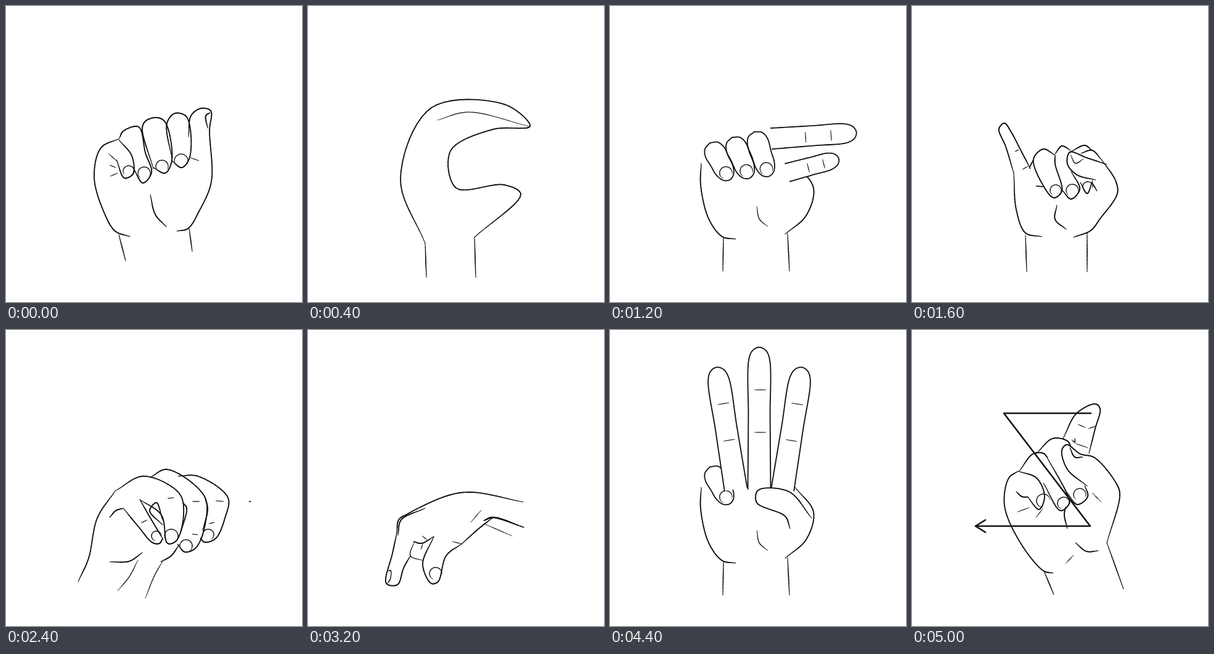
Recreate the animation shown at these times as an HTML page with a canvas. Size 480 by 480 pixels, loop 5200 ms.

```html
<!DOCTYPE html>
<html lang="en">
<head>
<meta charset="utf-8">
<title>Hand alphabet</title>
<style>
html, body { margin: 0; width: 100%; height: 100%; overflow: hidden; background: #fff; }
canvas { display: block; }
</style>
</head>
<body>
<canvas id="stage" width="480" height="480"></canvas>
<script>
const ctx = document.getElementById('stage').getContext('2d');
const STEP = 200;
const rad = deg => deg * Math.PI / 180;

function pairs(xy) {
  const pts = [];
  for (let i = 0; i < xy.length; i += 2) pts.push([xy[i], xy[i + 1]]);
  return pts;
}

// Centripetal spline through a few points.
function smooth(pts) {
  const gap = i => Math.sqrt(Math.hypot(pts[i + 1][0] - pts[i][0], pts[i + 1][1] - pts[i][1])) || 1;
  const last = pts.length - 1;
  const slope = (i, j) => {
    if (i === 0) return (pts[1][j] - pts[0][j]) / gap(0);
    if (i === last) return (pts[i][j] - pts[i - 1][j]) / gap(i - 1);
    const a = gap(i - 1), b = gap(i);
    return ((pts[i][j] - pts[i - 1][j]) / a * b + (pts[i + 1][j] - pts[i][j]) / b * a) / (a + b);
  };
  const out = [pts[0]];
  for (let i = 0; i < last; i++) {
    const g = gap(i);
    for (let k = 1; k <= 10; k++) {
      const t = k / 10, s = 1 - t;
      out.push([0, 1].map(j =>
        (1 + 2 * t) * s * s * pts[i][j] + t * t * (3 - 2 * t) * pts[i + 1][j] +
        g * t * s * (s * slope(i, j) - t * slope(i + 1, j))));
    }
  }
  return out;
}

function trace(pts) {
  ctx.beginPath();
  pts.forEach(p => ctx.lineTo(p[0], p[1]));
}

function ink(pts, width, taper) {
  const last = pts.length - 1;
  if (!taper) {
    ctx.lineWidth = width;
    trace(pts);
    ctx.stroke();
    return;
  }
  for (let i = 0; i < last; i++) {
    ctx.lineWidth = width * (0.6 + 0.4 * Math.min(1, Math.min(i, last - 1 - i) / 5));
    trace([pts[i], pts[i + 1]]);
    ctx.stroke();
  }
}

const pen = (...xy) => ink(smooth(pairs(xy)), 1.85, true);
const thin = (...xy) => ink(smooth(pairs(xy)), 1.25, true);
const bold = (...xy) => ink(smooth(pairs(xy)), 2.6, true);
const ruler = (...xy) => ink(pairs(xy), 2.6, false);

function patch(...xy) {
  const line = smooth(pairs(xy));
  trace(line);
  ctx.fill();
  ink(line, 1.85, true);
}

// Arc that stays open toward the fingertip.
function nail(x, y, r, deg) {
  const pts = [];
  for (let a = 55; a <= 305; a += 10) {
    pts.push([x + r * Math.cos(rad(deg + a)), y + r * Math.sin(rad(deg + a))]);
  }
  ink(pts, 1.25, true);
}

// Finger from its base; deg is measured clockwise from straight up.
function limb(x, y, deg, len, w, round) {
  const ux = Math.sin(rad(deg)), uy = -Math.cos(rad(deg)), r = w / 2;
  const at = ([along, side]) => [x + ux * along - uy * side, y + uy * along + ux * side];
  const half = round ? [[0, 0], [r * 0.3, r * 0.7], [r, r]] : [[0, r]];
  half.push([len / 2, r * 0.95], [len - r, r * 0.9], [len - r * 0.25, r * 0.55]);
  const mirror = half.map(([a, s]) => [a, -s]).reverse();
  const shape = smooth([...half, [len, 0], ...mirror].map(at));
  trace(shape);
  ctx.fill();
  ink(shape, 1.85, false);
  if (round) {
    nail(...at([len - r * 0.75, 0]), r * 0.6, deg - 90);
  } else {
    for (const k of [0.4, 0.7]) thin(...at([len * k, r * 0.6]), ...at([len * k, -r * 0.4]));
  }
}

// Fingers are numbered from the little finger, 0, to the index, 3.
const up = (k, deg, len) => limb(166 + 38 * k, 258, deg, len, k ? 37 : 32);
const curl = k => limb(162 + 36 * k, 222 - 9 * Math.min(k, 2), 152 + 5 * k, 68 + 4 * k, 34, true);

function palm(...curled) {
  pen(148, 255, 147, 290, 160, 345, 182, 374, 204, 378);
  pen(300, 255, 330, 295, 318, 340, 284, 370);
  pen(184, 375, 183, 430);
  pen(288, 369, 291, 430);
  thin(238, 325, 242, 345, 256, 358);
  curled.forEach(curl);
}

function thumb(drop = 0) {
  patch(327, 305, 290, 262 + drop, 240, 260 + drop, 238, 280 + drop, 284, 302 + drop, 292, 322);
}

function littleUp() {
  pen(165, 271, 152, 228, 141, 199, 150, 190, 160, 203, 178, 237, 192, 264);
  thin(167, 236, 173, 233);
  thin(179, 265, 188, 260);
  pen(165, 270, 169, 330, 184, 368, 211, 374);
  pen(190, 263, 197, 249);
  pen(232, 242, 213, 232, 197, 248, 211, 288, 230, 311, 243, 300, 232, 256, 232, 242);
  nail(233, 299, 9, 75);
  pen(201, 292, 214, 293);
  pen(232, 240, 243, 227, 257, 234);
  pen(243, 298, 258, 313, 272, 297, 258, 268);
  nail(260, 299, 10, 80);
  pen(258, 236, 280, 226, 292, 234);
  pen(273, 286, 284, 304, 293, 283);
  nail(285, 293, 8, 70);
  pen(292, 286, 300, 300);
  pen(316, 257, 283, 246, 256, 237, 252, 256, 268, 274, 298, 282);
  thin(257, 241, 265, 255, 278, 248);
  pen(274, 239, 292, 234, 308, 250);
  pen(308, 250, 330, 283, 333, 304, 305, 345, 290, 364, 262, 375);
  pen(235, 323, 232, 346, 250, 362);
  pen(184, 372, 186, 431);
  pen(284, 368, 284, 431);
}

function draped() {
  pen(117, 408, 134, 370, 148, 305, 177, 261);
  pen(177, 261, 223, 237, 281, 265, 288, 300, 276, 342, 262, 346, 252, 300, 217, 275);
  nail(268, 334, 11, 105);
  pen(168, 304, 178, 293, 191, 289);
  pen(191, 290, 214, 318, 238, 345, 249, 346, 254, 338);
  pen(217, 275, 236, 308, 255, 340);
  nail(244, 334, 8, 50);
  thin(219, 313, 229, 308);
  pen(254, 316, 233, 293, 244, 280, 254, 308);
  pen(234, 239, 261, 226, 322, 270, 323, 315, 308, 353, 290, 360, 278, 347);
  pen(283, 330, 293, 289, 288, 281);
  nail(292, 350, 10, 110);
  thin(302, 278, 314, 278);
  thin(262, 273, 272, 272);
  thin(302, 331, 311, 332);
  pen(168, 376, 200, 375, 221, 361);
  pen(251, 376, 268, 366, 281, 348);
  thin(214, 373, 200, 400, 181, 423);
  thin(255, 373, 240, 400, 226, 435);
}

function pointDown() {
  pen(349, 279, 265, 263, 225, 269, 160, 299, 147, 308, 144, 330);
  pen(190, 289, 151, 308, 146, 333);
  pen(145, 325, 137, 362, 127, 411, 145, 413, 155, 386, 166, 366);
  thin(130, 391, 134, 390, 133, 405, 128, 411);
  thin(173, 342, 166, 366, 187, 374);
  pen(171, 343, 184, 346, 204, 335);
  thin(185, 334, 193, 340);
  thin(183, 356, 186, 347);
  pen(204, 335, 186, 380, 200, 411, 211, 408, 224, 366, 249, 347);
  pen(249, 347, 277, 322, 300, 304);
  bold(285, 309, 300, 304, 350, 320);
  nail(207, 395, 10, 60);
  thin(234, 343, 250, 347);
  thin(281, 292, 264, 312);
  thin(285, 314, 331, 334);
}

const letters = {
  A() {
    pen(184, 215, 154, 230, 143, 278, 160, 337, 177, 365, 201, 374);
    pen(183, 217, 204, 243, 206, 272, 192, 279, 179, 249);
    nail(199, 268, 9, 95);
    thin(166, 239, 180, 252);
    thin(168, 258, 178, 262);
    thin(169, 276, 181, 271);
    pen(184, 214, 190, 203, 215, 196, 226, 238, 236, 270, 222, 287, 206, 262);
    nail(224, 271, 10, 80);
    pen(239, 264, 221, 198, 227, 186, 245, 181, 258, 188, 269, 250, 258, 271, 239, 262);
    nail(253, 260, 10, 80);
    pen(270, 252, 261, 190, 274, 174, 293, 180, 298, 245, 285, 262, 270, 252);
    nail(284, 251, 11, 85);
    pen(296, 212, 300, 178, 316, 166, 332, 170, 330, 202, 333, 285, 313, 333, 295, 361, 277, 365);
    pen(331, 173, 324, 178, 327, 198);
    thin(299, 246, 313, 251);
    pen(234, 306, 242, 338, 260, 358);
    pen(183, 371, 194, 413);
    pen(297, 361, 302, 398);
  },
  B() {
    palm();
    up(0, -8, 155);
    up(1, -3, 210);
    up(2, 0, 238);
    up(3, 5, 205);
    thumb(8);
  },
  C() {
    pen(190, 385, 150, 280, 200, 165, 320, 160, 360, 195, 300, 200, 231, 235, 240, 295, 318, 290, 345, 305, 270, 375);
    thin(210, 185, 260, 172, 358, 195);
    pen(190, 385, 192, 440);
    pen(270, 375, 272, 440);
  },
  D() {
    palm(0, 1, 2);
    up(3, 0, 215);
    thumb();
  },
  E() {
    pen(183, 211, 159, 220, 149, 290, 152, 337, 183, 380, 205, 384, 229, 374);
    pen(176, 211, 200, 231, 225, 255, 229, 269, 215, 277, 194, 260, 170, 247);
    nail(222, 261, 10, 25);
    thin(202, 243, 211, 239);
    thin(169, 273, 175, 263, 186, 261);
    pen(183, 209, 190, 195, 212, 193, 250, 230, 261, 260, 242, 265, 232, 255);
    nail(246, 251, 11, 40);
    thin(234, 230, 244, 227);
    pen(220, 196, 228, 185, 263, 181, 280, 205, 288, 248, 275, 265, 260, 255, 254, 217);
    nail(275, 250, 11, 85);
    thin(268, 221, 283, 219);
    thin(239, 201, 244, 206);
    pen(277, 195, 300, 188, 318, 208, 314, 264);
    pen(280, 196, 287, 212, 288, 246);
    nail(303, 255, 12, 85);
    pen(314, 258, 303, 268, 292, 260);
    thin(309, 222, 315, 223);
    pen(230, 268, 221, 279, 237, 298, 275, 297, 296, 313);
    thin(288, 302, 297, 306);
    pen(226, 284, 236, 292, 252, 288, 253, 268);
    pen(252, 299, 232, 328, 247, 358, 278, 369, 302, 360, 335, 306, 311, 266);
    pen(205, 303, 221, 284);
    thin(212, 304, 219, 293);
    thin(185, 384, 181, 440);
    thin(234, 393, 234, 426);
    pen(289, 369, 282, 400, 282, 431);
  },
  F() {
    palm();
    up(0, -8, 160);
    up(1, -3, 218);
    up(2, 0, 238);
    limb(302, 212, 214, 66, 34, true);
    thumb();
  },
  G() {
    palm(0, 1, 2);
    limb(262, 215, 86, 138, 34);
    limb(288, 270, 75, 86, 30);
  },
  H() {
    palm(0, 1);
    limb(258, 206, 84, 154, 34);
    limb(250, 240, 86, 154, 34);
    thumb(6);
  },
  I: littleUp,
  J() {
    littleUp();
    bold(135, 130, 136, 200, 117, 243, 104, 228);
    ruler(104, 245, 104, 228, 118, 234);
  },
  K() {
    palm(0, 1);
    up(2, -5, 210);
    up(3, 7, 240);
    limb(300, 310, -20, 110, 32);
  },
  L() {
    palm(0, 1, 2);
    up(3, 0, 230);
    limb(302, 290, 60, 112, 34);
  },
  M() {
    draped();
    pen(279, 237, 311, 237, 360, 272, 355, 305, 340, 338, 322, 344, 315, 337);
    pen(322, 270, 327, 290, 319, 325);
    nail(328, 332, 9, 110);
    thin(340, 277, 353, 278);
    thin(329, 314, 338, 312);
    thin(394, 278, 397, 278);
  },
  N: draped,
  O() {
    pen(185, 390, 150, 290, 200, 198, 298, 205, 322, 265, 280, 268, 240, 238, 248, 290, 316, 290, 268, 382);
    thin(200, 222, 245, 208, 305, 270);
    pen(185, 390, 186, 435);
    pen(268, 382, 270, 435);
  },
  P() {
    pointDown();
    limb(182, 310, -108, 110, 30);
  },
  Q: pointDown,
  R() {
    palm(0, 1);
    up(3, -10, 185);
    up(2, 12, 190);
    thumb();
  },
  S() {
    palm(0, 1, 2, 3);
    thumb(12);
  },
  T() {
    palm(0, 1, 2);
    limb(296, 305, -16, 130, 32);
    curl(3);
  },
  U() {
    pen(214, 195, 221, 100, 221, 64, 237, 50, 253, 62, 257, 180, 257, 208);
    thin(222, 104, 229, 107);
    thin(240, 108, 254, 107);
    thin(228, 159, 239, 162);
    pen(256, 76, 273, 65, 288, 80, 290, 115, 299, 170, 307, 257);
    thin(278, 115, 288, 117);
    thin(273, 160, 298, 163);
    thin(285, 204, 299, 206);
    pen(179, 223, 200, 197, 226, 201);
    pen(226, 210, 253, 257, 261, 293, 245, 301, 226, 285, 217, 268);
    nail(244, 282, 13, 60);
    thin(236, 294, 246, 297, 257, 283);
    pen(214, 413, 178, 399, 154, 325, 140, 263, 157, 223, 172, 219);
    pen(172, 219, 203, 235, 218, 268, 206, 275, 177, 260, 153, 250);
    nail(208, 259, 9, 40);
    thin(165, 270, 180, 264);
    thin(170, 258, 178, 249);
    pen(190, 289, 214, 276);
    pen(327, 285, 300, 255, 262, 220, 242, 187, 226, 197, 238, 230, 266, 272, 297, 304);
    thin(240, 192, 246, 213, 257, 216, 254, 203, 241, 190);
    thin(267, 277, 270, 292);
    pen(327, 285, 318, 345, 309, 398, 297, 406);
    pen(308, 399, 319, 443);
    pen(192, 414, 202, 452);
    pen(239, 345, 246, 372, 260, 383);
  },
  V() {
    palm(0, 1);
    up(2, -8, 218);
    up(3, 9, 220);
    thumb();
  },
  W() {
    palm(0);
    up(1, -9, 200);
    up(2, 0, 230);
    up(3, 9, 200);
    thumb();
  },
  X() {
    palm(0, 1, 2);
    up(3, 3, 130);
    limb(292, 132, 215, 70, 34, true);
    thumb();
  },
  Y() {
    palm();
    limb(176, 275, -30, 140, 32);
    [1, 2, 3].forEach(curl);
    limb(300, 305, 48, 138, 36);
  },
  Z() {
    pen(245, 176, 267, 135, 298, 120, 305, 128, 297, 160, 287, 200);
    thin(269, 153, 281, 158);
    thin(286, 160, 298, 156);
    thin(259, 178, 264, 182, 264, 176);
    thin(265, 184, 285, 191);
    pen(202, 200, 228, 176, 252, 180, 258, 190);
    pen(174, 229, 196, 201, 213, 200, 220, 207);
    pen(229, 394, 214, 391, 177, 347, 150, 285, 157, 240, 172, 229);
    pen(172, 229, 202, 240, 215, 270, 206, 291, 187, 270);
    nail(213, 277, 11, 45);
    pen(169, 262, 178, 270, 189, 271);
    thin(171, 295, 190, 288);
    thin(201, 304, 212, 290);
    pen(218, 205, 251, 265, 255, 281, 241, 293, 213, 248);
    nail(246, 281, 10, 60);
    pen(250, 262, 268, 283, 285, 270, 280, 252);
    nail(272, 267, 10, 75);
    pen(284, 253, 252, 226, 243, 195, 251, 186, 273, 201, 296, 207, 332, 250, 337, 268, 316, 345);
    pen(256, 191, 264, 206, 277, 206);
    thin(292, 264, 307, 279);
    pen(249, 287, 247, 300, 252, 322);
    pen(265, 345, 283, 359, 302, 358);
    thin(262, 365, 249, 379);
    pen(214, 391, 230, 429);
    pen(316, 345, 343, 420);
    ruler(290, 135, 149, 135, 289, 318, 103, 318);
    ruler(119, 308, 103, 318, 119, 328);
  }
};

const poses = Object.values(letters);
let shown = -1;

function frame() {
  const i = Math.floor(performance.now() / STEP) % poses.length;
  if (i !== shown) {
    shown = i;
    ctx.fillStyle = '#fff';
    ctx.strokeStyle = '#111';
    ctx.lineCap = ctx.lineJoin = 'round';
    ctx.fillRect(0, 0, 480, 480);
    poses[i]();
  }
  requestAnimationFrame(frame);
}
frame();
</script>
</body>
</html>
```
